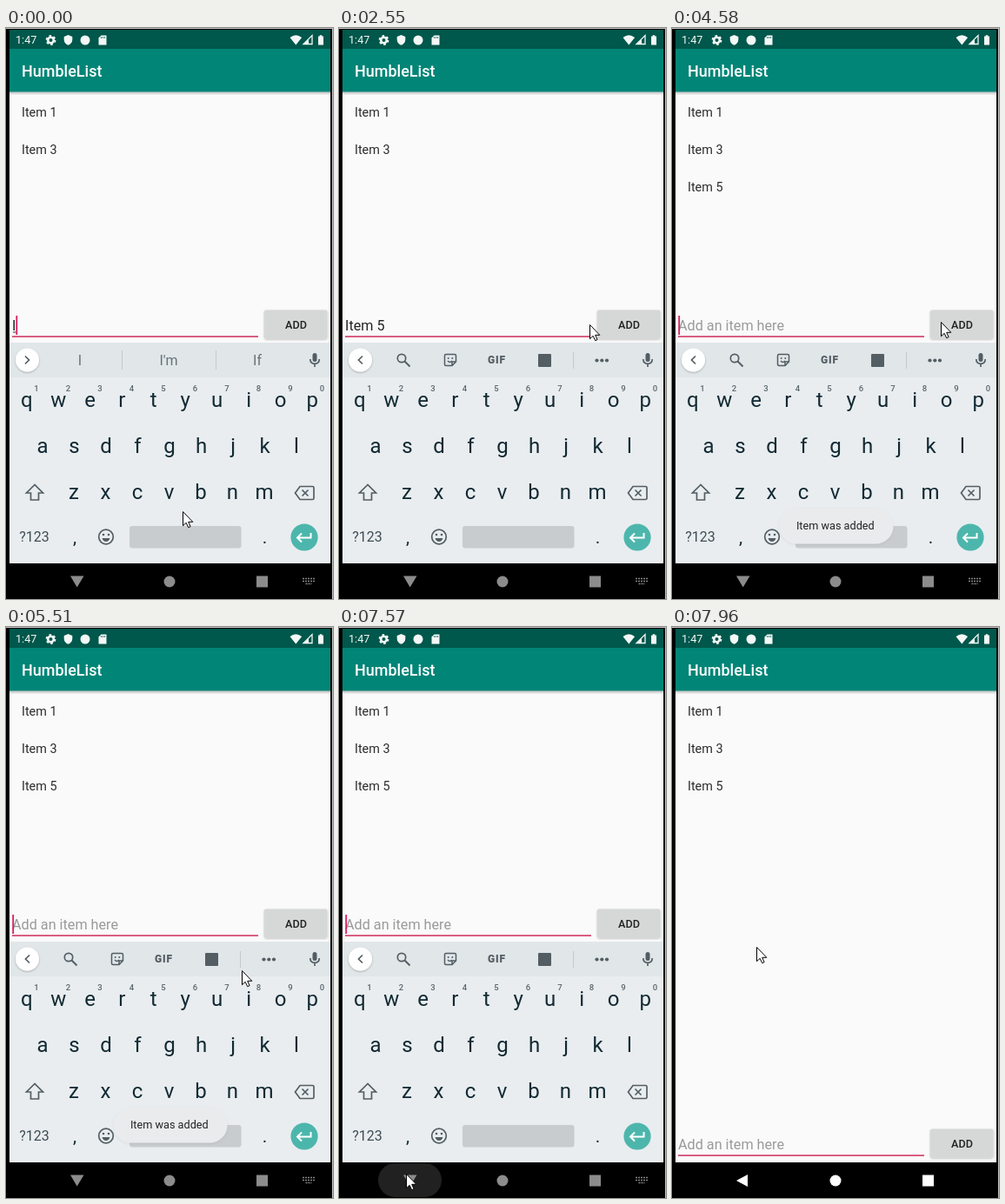
These frames come from a looping animation (376x657 px, 8000 ms). An HTML page:

```html
<!DOCTYPE html>
<html lang="en">
<head>
<meta charset="utf-8">
<title>Todo list</title>
<style>
html, body { margin: 0; width: 100%; height: 100%; overflow: hidden; background: #000; }
svg { display: block; width: 100%; height: 100%; font-family: Roboto, "Noto Sans", sans-serif; }
text { white-space: pre; }
.line { fill: none; stroke: #535e64; stroke-width: 1.7; }
.mid { text-anchor: middle; }
</style>
</head>
<body>
<svg viewBox="0 0 376 657">
  <defs>
    <linearGradient id="fade" x2="0" y2="1">
      <stop stop-color="#000" stop-opacity=".24"/>
      <stop offset="1" stop-color="#000" stop-opacity="0"/>
    </linearGradient>
    <filter id="soft" x="-20%" y="-20%" width="140%" height="150%">
      <feDropShadow dx="0" dy="1" stdDeviation="1" flood-opacity=".28"/>
    </filter>
    <filter id="faint" x="-20%" y="-20%" width="140%" height="150%">
      <feDropShadow dx="0" dy="1" stdDeviation="1.5" flood-opacity=".08"/>
    </filter>
  </defs>

  <rect width="376" height="657" fill="#c4c4c4"/>
  <rect y="1" width="375" height="656"/>
  <rect x="4" y="24" width="369" height="592" fill="#fafafa"/>
  <rect x="4" y="2" width="369" height="22" fill="#00574b"/>
  <rect x="4" y="24" width="369" height="49.500" fill="#008577"/>
  <rect x="4" y="73.500" width="369" height="4" fill="url(#fade)"/>
  <text x="18" y="56" font-size="18" font-weight="500" fill="#fff">HumbleList</text>

  <g fill="#f3f8f7">
    <text x="11" y="18.300" font-size="12.600">1:47</text>
    <circle cx="51.500" cy="14" r="3.300" fill="none" stroke="#f3f8f7" stroke-width="2.600"/>
    <circle cx="51.500" cy="14" r="5" fill="none" stroke="#f3f8f7" stroke-width="1.800" stroke-dasharray="2.620"/>
    <path d="M71.500 8l4.800 2v3.500q-.3 4.500-4.800 6.300q-4.500-1.800-4.800-6.300V10z"/>
    <circle cx="91" cy="14" r="5.500"/>
    <path d="M109.500 8.500h6v11h-9v-8z"/>
    <path d="M326.500 11q6.800-5.500 13.600 0l-6.800 8.500z"/>
    <path d="M342 18.500h10V8.500z" fill="none" stroke="#f3f8f7" stroke-width="1.300"/>
    <path d="M342 19l6-6v6zM359 9.500h1.700V8.300h2.600v1.200h1.700v10h-6z"/>
  </g>
  <path d="M109.500 10v2M111.500 10v2M113.500 10v2" stroke="#00574b" stroke-width=".8"/>

  <g font-size="14.4" fill="#2b2b2b">
    <text x="18" y="101.500">Item 1</text>
    <text x="18" y="144.700">Item 3</text>
    <text x="18" y="187.700" id="added">Item 5</text>
  </g>

  <g id="entry">
    <text id="hint" x="7" y="348" font-size="16.2" fill="#9a9a9a">Add an item here</text>
    <text id="typed" x="7" y="348" font-size="16.2" fill="#222"></text>
    <rect id="under" x="8" y="349.500" height="1" fill="#333"/>
    <rect id="caret" y="331" width="1.800" height="22" fill="#d81b60"/>
    <rect x="7" y="354.300" width="283" height="1.500" fill="#cf2c5c"/>
    <rect x="297" y="324.500" width="72.500" height="33" rx="2" fill="#d6d7d7" filter="url(#soft)"/>
    <rect id="press" x="297" y="324.500" width="72.500" height="33" rx="2" opacity="0"/>
    <text class="mid" x="333.500" y="345.800" font-size="12.600" font-weight="500" fill="#222">ADD</text>
  </g>

  <g id="keyboard">
    <rect x="4" y="362" width="369" height="254" fill="#e9edf0"/>
    <rect x="4" y="362" width="369" height="40" fill="#e1e6e9"/>
    <circle cx="24.500" cy="382" r="13.500" fill="#fff" filter="url(#soft)"/>
    <path id="chevron" class="line"/>
    <g id="words" class="mid" font-size="16" fill="#667278">
      <text x="85" y="388"></text><text x="187" y="388"></text><text x="289" y="388"></text>
      <path d="M133.500 371v22M241.500 371v22" stroke="#c3c9cd"/>
    </g>
    <g id="tools">
      <g class="line">
        <circle cx="72" cy="380" r="4.700"/><path d="M75.500 383.500l6 6" stroke-width="2"/>
        <path d="M123 375.500h10q1.500 0 1.500 1.500v7l-4.500 4.500h-7q-1.500 0-1.500-1.500v-10q0-1.500 1.500-1.500zM134.500 384h-4.500v4.500M125 383q2.500 3 5 0" stroke-width="1.500"/>
        <path d="M269.500 373v19" stroke="#c3c9cd" stroke-width="1"/>
      </g>
      <g fill="#535e64">
        <circle cx="125.700" cy="380" r="1"/><circle cx="130.300" cy="380" r="1"/>
        <text class="mid" x="181.500" y="386.300" font-size="12" font-weight="900" letter-spacing=".8">GIF</text>
        <rect x="229" y="375" width="15" height="15" rx="1"/>
        <circle cx="296.500" cy="382.500" r="2.100"/><circle cx="302.300" cy="382.500" r="2.100"/><circle cx="308" cy="382.500" r="2.100"/>
      </g>
    </g>
    <rect x="352.500" y="374" width="5" height="10" rx="2.500" fill="#535e64"/>
    <path class="line" d="M349.800 381q0 5.300 5.200 5.300t5.200-5.300M355 386v4"/>
    <g id="keys" class="mid" fill="#122a33"></g>
    <path class="line" d="M33 525.500l-9.500 9.500h5v8h9v-8h5z"/>
    <path class="line" d="M338 527.500h14.500q1.500 0 1.500 1.500v12q0 1.500-1.500 1.500H338l-5.500-7.500zM340.500 531.500l7 7M347.500 531.500l-7 7"/>
    <circle class="line" cx="115" cy="585.500" r="8.300"/>
    <path d="M110.500 587h9q-1.200 4-4.500 4t-4.500-4z" fill="#535e64"/>
    <circle cx="112" cy="583" r="1.300" fill="#535e64"/><circle cx="118" cy="583" r="1.300" fill="#535e64"/>
    <rect x="142" y="573" width="128.500" height="25.500" rx="3" fill="#c8cccf"/>
    <circle cx="343" cy="586" r="15.600" fill="#4db6ac"/>
    <path d="M350.500 581v5.500h-14.500M340 581.500l-5 5l5 5" fill="none" stroke="#fff" stroke-width="2"/>
  </g>

  <g id="toast">
    <rect x="123.500" y="553" width="131" height="40.500" rx="20.250" fill="#e9ebed" filter="url(#faint)"/>
    <text class="mid" x="187.800" y="577" font-size="12.700" fill="#222">Item was added</text>
  </g>

  <rect y="616" width="375" height="41"/>
  <rect id="ripple" x="45" y="617" width="73" height="39" rx="19.500" fill="#fff"/>
  <g id="nav">
    <path id="back"/>
    <circle cx="188" cy="637" r="6.500"/>
    <rect x="288" y="630.500" width="13" height="13"/>
    <path id="switcher" d="M341 633.500h14M341 636.500h14M344.500 639.500h7" fill="none" stroke="#858585" stroke-width="1.700" stroke-dasharray="2 1"/>
  </g>
  <path id="pointer" d="M0 0V16.200L3.700 12.800L6.200 18.200L8.600 17.100L6.200 11.800H11.300Z" fill="#fff" stroke="#000"/>
</svg>
<script>
const el = id => document.getElementById(id);
const clamp = v => Math.max(0, Math.min(1, v));
const ramp = (t, from, to) => clamp((t - from) / (to - from));
const show = (id, on) => el(id).setAttribute("opacity", Number(on));
const move = (id, x, y) => el(id).setAttribute("transform", `translate(${x} ${y})`);

const LOOP = 8000, ADDED = 3490, CLOSE = 7570;

// Bursts of redraws: first time, last time, count
const bursts = [
  [0, 0, 1], [400, 400, 1], [680, 950, 3], [1350, 1350, 1], [1750, 1870, 2],
  [2150, 2270, 2], [2550, 3490, 7], [3610, 4000, 4], [4430, 5360, 8],
  [5510, 6440, 8], [6560, 6860, 3], [7260, 7260, 1], [7570, 7960, 4]
];
const ticks = bursts.flatMap(([a, b, n]) =>
  Array.from({ length: n }, (_, i) => n > 1 ? a + (b - a) * i / (n - 1) : a));

const typing = [
  [0, "I", "I", "I'm", "If"],
  [680, "It", "It", "It's", "Its"],
  [810, "Ite", "Item", "Items", "Ite"],
  [950, "Item", "Item", "Items", "Itemized"],
  [1350, "Item ", "is", "number", "in"],
  [1750, "Item 5", "5", "5th", "50"],
  [ADDED, "", "", "", ""]
];

const path = [
  [0, 203, 556], [1870, 203, 556], [2150, 250, 430], [2270, 285, 345],
  [2550, 288, 341], [2860, 325, 345], [3020, 331, 343], [4000, 331, 341],
  [4430, 322, 340], [4563, 309, 338], [5360, 298, 358], [6307, 128, 591],
  [6440, 100, 608], [6860, 77, 629], [7570, 77, 629], [7700, 82, 560], [7960, 97, 368]
];

function pointerAt(t) {
  const i = path.findIndex(p => p[0] > t);
  if (i < 0) return path.at(-1).slice(1);
  const [a, b] = [path[i - 1], path[i]], k = ramp(t, a[0], b[0]);
  return [a[1] + (b[1] - a[1]) * k, a[2] + (b[2] - a[2]) * k];
}

function caretOn(t) {
  if (t >= ADDED) return t < 3700 || (t + 800) % 1000 < 500;
  if (t < 680) return t < 400;
  return t < 2250 || (t >= 2750 && t < 3250);
}

function buildKeys() {
  const label = (x, y, s, size, extra = "") =>
    `<text x="${x}" y="${y}" font-size="${size}" ${extra}>${s}</text>`;
  const row = (letters, x, y) =>
    [...letters].map((c, i) => label(x + 36.5 * i, y, c, 24)).join("");
  const digits = [..."1234567890"].map((c, i) =>
    label(35 + 36.5 * i, 418, c, 9.5, 'fill="#59666c" font-weight="500"')).join("");
  el("keys").innerHTML = row("qwertyuiop", 23.7, 436) + digits + row("asdfghjkl", 42, 488.5) +
    row("zxcvbnm", 78, 542) + label(32.5, 591, "?123", 16, 'fill="#3f4d54"') +
    label(79, 593, ",", 21) + label(297.5, 593, ".", 21);
}

function drawEntry(t) {
  const [, text, ...words] = typing.findLast(s => s[0] <= t + 10);
  const typed = el("typed");
  typed.textContent = text;
  const width = text ? typed.getComputedTextLength() : 0;
  el("under").setAttribute("width", t < 1350 ? Math.max(0, width - 1) : 0);
  el("caret").setAttribute("x", text ? 7 + width : 7.3);
  el("words").querySelectorAll("text").forEach((w, i) => w.textContent = words[i]);

  show("hint", !text);
  show("caret", caretOn(t) && t < 7700);
  show("press", t < 3330 ? 0 : 0.12 * (1 - ramp(t, 3490, 3800)));
  show("added", ramp(t, ADDED, 3740));
  move("entry", 0, t > CLOSE ? 253 : 0);
}

function draw(now) {
  const t = ticks.findLast(s => s <= now);
  drawEntry(t);

  const tools = t >= 1870;
  show("words", !tools);
  show("tools", tools);
  el("chevron").setAttribute("d", tools ? "M27 377.5l-4.5 4.5l4.5 4.5" : "M22 377.5l4.5 4.5l-4.5 4.5");
  move("keyboard", 0, 254 * ramp(t, CLOSE, 7830));
  show("toast", t < 4000 ? 0 : t < 4430 ? 0.2 : 1 - ramp(t, 5900, 6200));

  const closing = t > CLOSE;
  show("ripple", t < CLOSE ? 0 : 0.13 * (1 - ramp(t, CLOSE, 7830)));
  el("nav").setAttribute("fill", closing ? "#fff" : "#8c8c8c");
  el("back").setAttribute("d", closing ? "M74 637L87 630V644Z" : "M74 630.5H89.5L81.7 643.5Z");
  show("switcher", !closing);
  move("pointer", ...pointerAt(t).map(v => Math.round(v) + 0.5));
}

function frame() {
  draw(performance.now() % LOOP);
  requestAnimationFrame(frame);
}

buildKeys();
frame();
</script>
</body>
</html>
```
